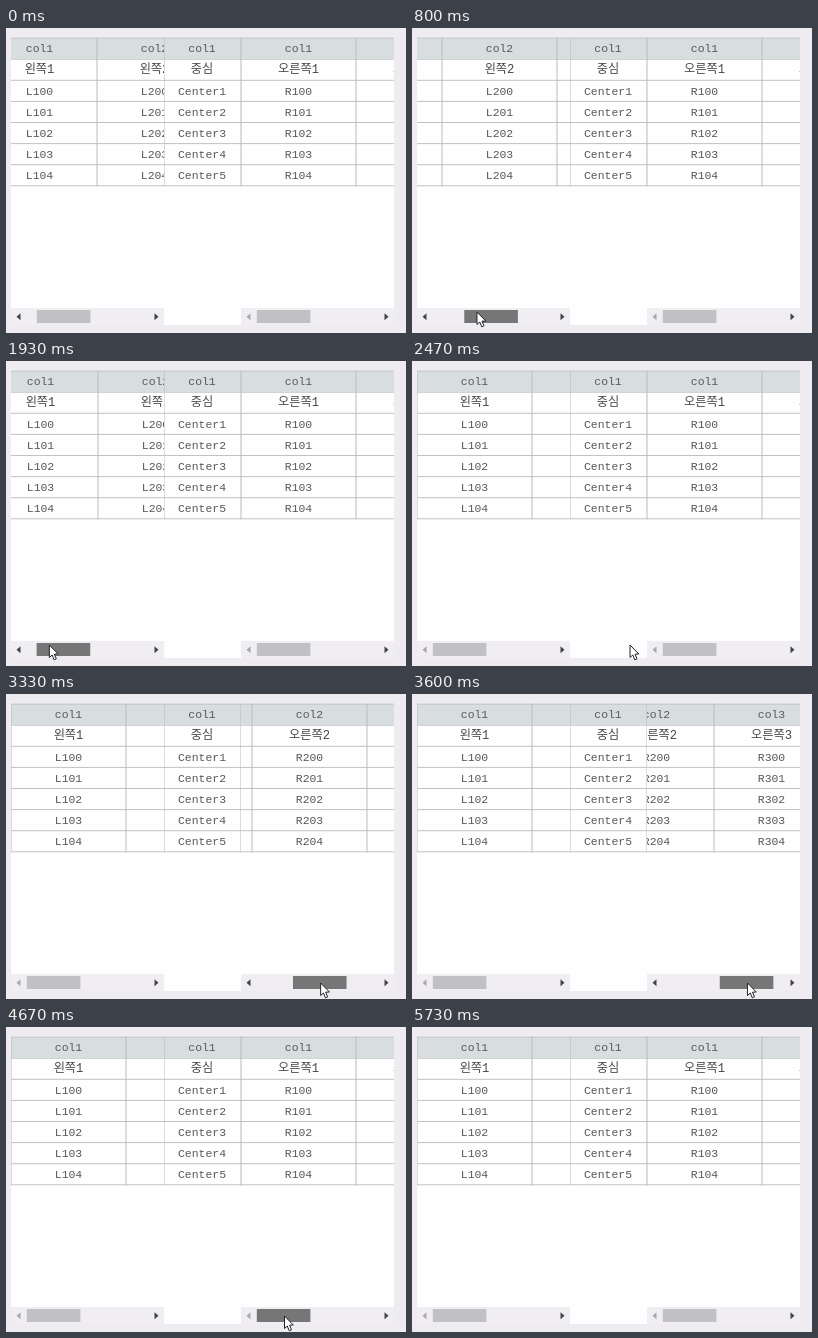
An HTML page with a canvas that plays this animation: 400x305 px, repeating every 5.8 s.

```html
<!DOCTYPE html>
<html lang="ko">
<head>
<meta charset="utf-8">
<title>Split grid</title>
<style>
html, body { margin: 0; width: 100%; height: 100%; overflow: hidden; background: #eeecf0; }
canvas { display: block; }
</style>
</head>
<body>
<canvas id="stage" width="400" height="305"></canvas>
<script>
const ctx = document.getElementById('stage').getContext('2d');
const LOOP = 5800, FRAME = 1000 / 15;
const COL = 115, VIEW = 153, TRAVEL = 67, RANGE = 3 * COL - VIEW;
const LEFT = 5, CENTER = 158, RIGHT = 235;
const TOP = 9.6, PITCH = 21.1, ROWS = 7;
const LEFT_GRAB = 33, RIGHT_GRAB = 278;
const MONO = '11.45px "Liberation Mono", monospace';
const HANGUL = '12.2px "Liberation Mono", "Noto Sans CJK KR", "Noto Sans CJK", monospace';

const clamp = (v, lo, hi) => Math.min(hi, Math.max(lo, v));
const ramp = (t, from, to) => clamp((t - from) / (to - from), 0, 1);
const easeOut = k => 1 - (1 - k) ** 2;
const range = (n, f) => Array.from({ length: n }, (_, i) => f(i));

// enter, drag the left thumb there and back, cross over, drag the right thumb, leave
function pointer(t) {
  const x = 62 - 19 * ramp(t, 130, 530)
    + 76 * ramp(t, 670, 1130) - 76 * ramp(t, 1270, 1930) - 10 * ramp(t, 1930, 2130)
    + 245 * easeOut(ramp(t, 2200, 2730))
    + 70 * ramp(t, 2870, 3767) - 70 * ramp(t, 4270, 4600) + 14 * ramp(t, 4670, 5070);
  const sink = 1 - ramp(t, 130, 530) + ramp(t, 4670, 5070);
  return [x, 284 + 5 * ramp(t, 2470, 2730) + 28 * sink];
}

function rect(color, x, y, w, h) {
  ctx.fillStyle = color;
  ctx.fillRect(x, y, w, h);
}

function shape(color, points) {
  ctx.beginPath();
  points.forEach(p => ctx.lineTo(...p));
  ctx.closePath();
  ctx.fillStyle = color;
  ctx.fill();
}

const divider = x => rect('#b9bbbc', x - .5, TOP, 1, PITCH * ROWS + 1);

function column(cx, cells) {
  cells.forEach((text, i) => {
    const label = i === 1;
    ctx.font = label ? HANGUL : MONO;
    ctx.fillStyle = label ? '#484848' : '#585858';
    ctx.fillText(text, cx, 24.3 + PITCH * i);
  });
}

function panel(x, width, draw) {
  ctx.save();
  ctx.beginPath();
  ctx.rect(x, 9, width, 288);
  ctx.clip();
  rect('#fefefe', x, 9, width, 288);
  rect('#d8dee0', x, TOP, width, PITCH);
  for (let i = 0; i <= ROWS; i++) rect('#c0c2c3', x, TOP + PITCH * i, width, 1);
  draw();
  ctx.restore();
}

function arrow(x, dir, active) {
  shape(active ? '#444' : '#a9a8aa', [[x - 2 * dir, 285.3], [x + 2 * dir, 288.8], [x - 2 * dir, 292.3]]);
}

function scrollPanel(x, letter, label, offset, dark) {
  const scroll = Math.round(offset * RANGE / TRAVEL);
  panel(x, VIEW, () => {
    for (let k = 0; k <= 3; k++) {
      const end = x + COL * k - scroll;
      divider(end);
      column(end - COL / 2, ['col' + k, label + k, ...range(5, n => letter + k + '0' + n)]);
    }
    rect('#f0eef2', x, 280, VIEW, 17);
    rect(dark ? '#767676' : '#c1c0c2', x + 15.8 + offset, 282, 53.6, 13);
    arrow(x + 7.5, -1, offset > 0);
    arrow(x + VIEW - 7.5, 1, offset < TRAVEL);
  });
}

function cursor(x, y) {
  const outline = [[0, 0], [0, 12.5], [2.8, 10], [4.8, 14.8], [7, 13.8], [5, 9.2], [8.8, 9]];
  shape('#fff', outline.map(([dx, dy]) => [x + dx + .5, y + dy]));
  ctx.strokeStyle = '#222';
  ctx.lineWidth = 1;
  ctx.stroke();
}

function draw(now) {
  const t = Math.floor((now % LOOP + 4) / FRAME) * FRAME % LOOP;
  const [px, py] = pointer(t);
  const leftOffset = t < 660 ? 10 : t < 2190 ? clamp(px - LEFT_GRAB, 0, TRAVEL) : 0;
  const rightOffset = t > 2860 && t < 4660 ? clamp(px - RIGHT_GRAB, 0, TRAVEL) : 0;

  rect('#eeecf0', 0, 0, 400, 305);
  ctx.textAlign = 'center';
  scrollPanel(LEFT, 'L', '왼쪽', leftOffset, t > 590 && t < 2260);
  panel(CENTER, RIGHT - CENTER, () => {
    divider(CENTER);
    divider(RIGHT);
    column(196, ['col1', '중심', ...range(5, n => 'Center' + (n + 1))]);
  });
  scrollPanel(RIGHT, 'R', '오른쪽', rightOffset, t > 2790 && t < 4730);
  cursor(px, py);
}

const start = performance.now();
function tick() {
  draw(performance.now() - start);
  requestAnimationFrame(tick);
}
tick();
</script>
</body>
</html>
```
